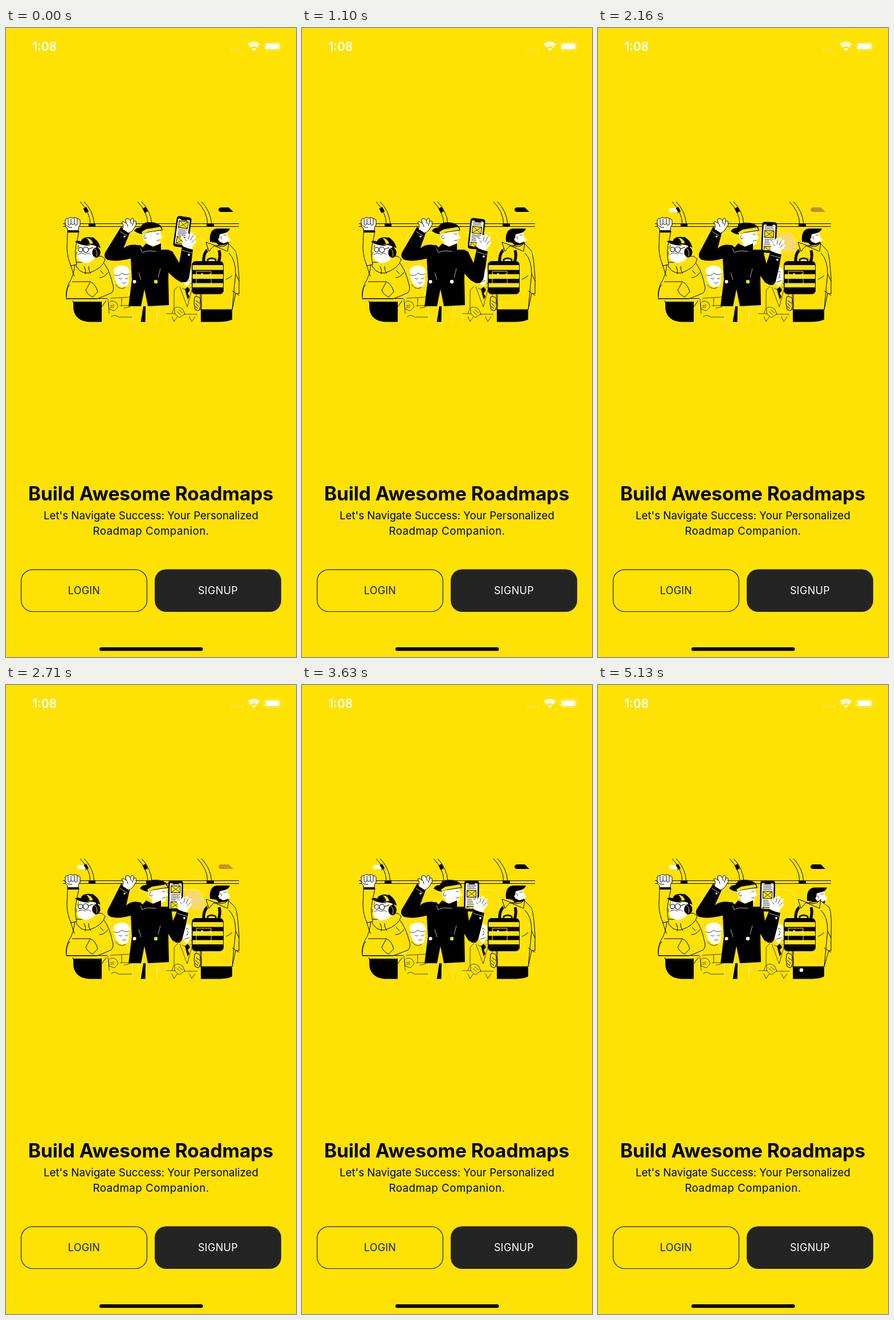
Animation of 509 by 1101 pixels, one loop 5160 ms. Source, as an HTML page:

```html
<!DOCTYPE html>
<html lang="en">
<head>
<meta charset="utf-8">
<title>Build Awesome Roadmaps</title>
<style>
html, body { margin: 0; width: 100%; height: 100%; overflow: hidden; background: #fee204; }
svg { display: block; width: 509px; height: 1101px; font-family: Inter, sans-serif; }
.k { fill: #000; }
.w { fill: #fff; }
.y { fill: #fee204; }
.l { fill: none; stroke: #000; stroke-width: 1; }
.y.o, .w.o { stroke: #000; stroke-width: 1; }
.t { fill: none; stroke: #fff; stroke-width: .7; }
.p { fill: none; stroke: #fff27a; stroke-width: .9; }
.d { fill: none; stroke: #000; stroke-width: .7; }
.mid { text-anchor: middle; }
</style>
</head>
<body>
<svg viewBox="0 0 509 1101">
  <defs>
    <clipPath id="screen"><rect x="-10.5" y="-22.5" width="21" height="45" rx="2"/></clipPath>
    <clipPath id="scene"><path d="M98 300H411V490Q408 514.5 374 514.5H146Q122 513 118 492H98Z"/></clipPath>
  </defs>

  <!-- status bar -->
  <text x="46.500" y="40" font-size="20.800" font-weight="600" fill="#fff">1:08</text>
  <g fill="#fff" opacity=".25">
    <circle cx="397" cy="38" r="1.9"/><circle cx="403" cy="38" r="1.9"/>
    <circle cx="409" cy="38" r="1.9"/><circle cx="415" cy="38" r="1.9"/>
  </g>
  <path class="w" d="M435 40L431.3 36.2Q435 33.2 438.7 36.2Z"/>
  <path d="M428 33.2A10 10 0 0 1 442 33.2M425.300 29.800A14 14 0 0 1 444.700 29.800" fill="none" stroke="#fff" stroke-width="3.500"/>
  <rect x="453" y="24.7" width="29.5" height="14.6" rx="4.4" fill="none" stroke="#fff" opacity=".4"/>
  <rect class="w" x="455.3" y="27" width="24.6" height="10" rx="2.6"/>
  <path class="w" opacity=".45" d="M484 29.8Q486.4 32 484 34.4Z"/>

  <g clip-path="url(#scene)">
    <!-- carriage -->
    <path id="pane" d="M314 360H331Q347 362 347 380V392H328Z" fill="#f6d873"/>
    <path class="p" d="M182 470V370Q183 358 196 358H236M282 358H330Q347 360 347 380V410M265 490V515M282 490V515"/>
    <g id="arches"></g>
    <path class="k" d="M135.5 316L141 313L145 321L139.5 324ZM239.5 316L245 313L249 321L243.5 324Z"/>
    <path id="lampL" class="w" d="M129 315H136L141 322.5H129Q125 321.5 125 318.7Q125 316 129 315Z"/>
    <path id="lampR" d="M377 314H391L399 322H377Q373 321 373 318Q373 315 377 314Z"/>
    <path class="l" d="M100 342.5H409M100 347.5H409"/>
    <path class="k" d="M145 342H157V347H145ZM246 342H258V347H246ZM352 342H365V347H352Z"/>

    <!-- seated reader -->
    <path class="w" d="M190 431Q186 420 197 417Q210 413 216 422Q220 428 215 434Q217 443 214 450Q207 456 199 452Q191 445 190 431Z"/>
    <path class="d" d="M190 432Q197 436 203 429Q211 434 216 430M198 438Q201 441 204 438M209 438Q212 441 214 437M204 446Q208 448 211 445M192 449Q200 460 210 454"/>
    <path class="p" d="M191 452Q181 459 180 472L177 497M211 455L216 463V472"/>
    <path class="d" d="M183 473L218 471V486H200M203 472V486M180 482Q185 474 194 481L197 488L190 495L181 492ZM183 486L190 485M183 489L190 488M179 474L181 500M184 506Q190 500 198 506H222M207 490Q214 490 221 486"/>

    <!-- seated man -->
    <path class="w" d="M312 422Q318 415 324 422Q328 434 323 445L317 453L309 442Z"/>
    <path class="d" d="M316 427Q319 425 321 428M319 430V437L316 438M313 445L322 442M302 452L295 459V490L291 500M324 446L334 457V492M305 453L318 488L328 452M309 455L318 460L325 453"/>
    <path class="k" d="M314 457L319 453L323 459L319 464L322 470L319 475L316 465Z"/>
    <path class="d" d="M296 490Q302 486 310 492L314 501L304 507L296 500ZM300 496L307 502M303 493L310 499M281 500H297M312 501H336M291 505L295 514L301 505M322 505L326 514L332 505"/>

    <!-- rider with headphones -->
    <path class="k" d="M118 479H168V515H119Z"/>
    <path class="l" d="M117 477L121 487M176 477L168 488"/>
    <path id="hoodie" class="y o"/>
    <path class="l" d="M116 444H148Q158 449 161 462L152 471M148 444L140 459Q143 467 152 471M112 449Q106 455 106 470M179 428Q172 437 164 437M165 424L171 430M113 414L120 435M106 473.500H178"/>
    <path class="y o" d="M121 410Q126 430 145 429Q170 421 174 405Q168 396 158 401Q145 412 121 410Z"/>
    <path class="l" d="M137 417Q141 424 139 431M145 417Q144 424 149 430"/>
    <path class="y o" d="M108 356L107 386Q108 404 114 416L124 414Q119 391 125 371L128 356Z"/>
    <path class="w o" d="M104 338Q103 333 109 334Q112 330 117 333Q122 330 125 334Q130 333 130 338V345Q126 349 127 355H108Q109 350 104 347Z"/>
    <path class="l" d="M109 335V344Q112 347 114 342V334M120 333V342Q117 346 114 342M125 334V344Q121 347 120 342M103 342Q108 350 116 349"/>
    <path class="k" d="M108 354H128V358H108Z"/>
    <g id="rider">
      <path class="w" d="M128 379L126 388L123 391L125 397Q125 408 136 411Q149 413 158 401L160 381Z"/>
      <path class="d" d="M128 380L126 386M124 391V397M126 397Q132 392 139 396Q145 392 149 397"/>
      <circle class="l" cx="131" cy="388" r="4"/><circle class="l" cx="140" cy="388" r="4.8"/>
      <path class="l" d="M145 387L153 384"/>
      <path class="k" d="M131 377Q131 367 144 366Q161 366 166 385L153 380Z"/>
      <path class="y" d="M141 368Q149 367 153 377L147 378Q146 371 141 368Z"/>
      <path class="k" d="M121 374Q127 370 136 376L148 381Q133 382 121 374Z"/>
      <path d="M151 367Q161 373 160 386" fill="none" stroke="#000" stroke-width="3"/>
      <ellipse class="k" cx="158.500" cy="393" rx="7.200" ry="9"/>
      <path class="p" d="M155 386Q162 390 159 400"/>
      <path class="p" d="M163 380Q174 389 171 405" stroke-dasharray="1 1" stroke-width="3"/>
    </g>

    <!-- standing man with rucksack -->
    <path class="k" d="M342 492H397V515H342Z"/>
    <circle id="stud" class="w" cx="357" cy="499" r="3.300"/>
    <g id="rider2">
      <path class="w" d="M371 359L387 355L389 364L394 371L390 374L388 381L371 382Z"/>
      <path class="k" d="M358 374Q356 352 371 351H393Q391 357 384 359L375 361L374 367L369 376Z"/>
      <path class="k" d="M371 368L375 374L382 377L390 374L388 381Q376 385 369 376Z"/>
      <path class="d" d="M382 363L387 362M375 366Q379 364 378 370"/>
    </g>
    <path id="coat" class="y o"/>
    <path class="y o" d="M351 375L356 391L365 381L389 391L391 375Q385 385 371 382Z"/>
    <path class="l" d="M391 394Q403 405 403 430L397 493M403 430L409 443M397 460L409 468M386 440Q394 437 397 433"/>
    <path class="p" d="M395 380Q404 387 404 397" stroke-dasharray="1 1.200" stroke-width="5"/>
    <path d="M347 410Q346 396 353 389M373 410Q377 399 374 389" fill="none" stroke="#000" stroke-width="5"/>
    <path d="M354 409V405Q361 401 368 405V409" fill="none" stroke="#000" stroke-width="2.500"/>
    <rect class="k" x="326" y="408" width="56" height="58" rx="7"/>
    <path class="y" d="M327.500 415H381V423.500H327.500ZM327.500 431H381V439H327.500ZM327.500 446.500H381V454H327.500Z"/>
    <path class="p" d="M334 426H360V450H334ZM334 430L344 436L360 430" stroke-width=".6"/>
    <circle class="w" cx="344" cy="431" r="1.800"/>
    <path class="y o" d="M331 471Q337 468 341 474L343 486L338 495L332 493L330 482Z"/>
    <path class="l" d="M333 477L340 482M332 482L338 487M332 487L337 491M341 466V494"/>

    <!-- man with phone -->
    <path class="p" d="M222 487V515M270 486V500"/>
    <path class="k" d="M241 487L236.500 515H244.500L245 487Z"/>
    <g id="head">
      <path class="w" d="M244 357L271 354L271 360L275 367L271 369L270 377Q263 382 247 380L246 373Q239 371 240 362Z"/>
      <path class="d" d="M245 362Q240 363 243 368Q246 370 247 366M264 361Q267 359 269 361M264 372L270 371"/>
      <path class="k" d="M225 355Q228 349 236 349Q240 339 252 340Q266 339 273 348L275 354L248 358Q236 364 225 355Z"/>
      <path class="y" d="M246 352L271 348L273.500 353L249 357L240 361L238 357Z"/>
    </g>
    <path class="k" d="M218 387L235 380L240 384L246 377L258 383L272 377V388L286 388L285 440L286 485L249 487L243 457L237 487H215L221 440Z"/>
    <path id="armL" class="k"/>
    <path class="w o" d="M204 352Q208 345 203 340Q205 337 211 342L210 335Q214 331 218 337L221 333Q225 333 224 338Q230 337 228 342Q230 345 226 348Q222 357 215 359Z"/>
    <path class="l" d="M211 342Q214 344 214 348M218 337L220 343M224 338L222 346"/>
    <path class="t" d="M200 356L213 364M236 386L239 393L249 390L264 391M233 428L237 441M271 421L267 437"/>
    <circle class="w" cx="208" cy="365" r="1.800"/>
    <circle class="w" cx="225.500" cy="444" r="3"/>
    <circle id="button" cx="263" cy="444" r="3.200"/>
    <path id="armR" class="k"/>
    <g id="phone">
      <rect class="k" x="-13" y="-27" width="26" height="54" rx="4.500"/>
      <rect class="w" x="-10.500" y="-22.500" width="21" height="45" rx="2"/>
      <g clip-path="url(#screen)"><g id="feed"></g></g>
      <path class="k" d="M-5 -23H5V-20.500H-5Z"/>
    </g>
    <g id="hand">
      <path class="w" d="M306 363Q310 363 314 369L317 362Q320 356 322 362L325 358Q329 358 328 363L332 362Q335 364 331 370L334 371Q334 376 328 381L326 387L312 383Q307 380 310 374Z"/>
      <path class="d" d="M314 369L317 373M322 362L320 370M328 363L324 372M331 370L326 376"/>
      <path class="t" d="M309 389L327 394"/>
      <circle class="w" cx="321" cy="397" r="1.900"/>
    </g>
  </g>

  <!-- copy and buttons -->
  <text class="mid" x="254" y="827" font-size="33.400" font-weight="700">Build Awesome Roadmaps</text>
  <text class="mid" x="254.500" y="859.500" font-size="18.700">Let's Navigate Success: Your Personalized</text>
  <text class="mid" x="254.500" y="887" font-size="18.700" letter-spacing=".5">Roadmap Companion.</text>
  <rect x="26.600" y="948.100" width="220.800" height="73.400" rx="20" fill="none" stroke="#1c1c1c" stroke-width="1.200"/>
  <rect x="261" y="947.500" width="222" height="74.500" rx="20" fill="#242424"/>
  <text class="mid" x="137" y="990.700" font-size="18" letter-spacing=".2" fill="#1c1c1c">LOGIN</text>
  <text class="mid" x="372" y="990.700" font-size="18" letter-spacing=".3" fill="#fff">SIGNUP</text>
  <rect x="164" y="1084" width="181.500" height="6.300" rx="3.150"/>
</svg>
<script>
const LOOP = 5160;
const times = [0, 610, 1610, 2710, 3630, 4180, 5130];
const eased = {
  lower: [0, 0, .55, 1, 1, 1, 1],
  headX: [0, 0, 6, 10, 6, 4, 5],
  sway:  [0, 0, 3, 5, 1, 0, -1],
  nod:   [0, 1, -.6, -.6, 1, 1, -.6],
  turn:  [0, 0, 0, 0, 0, 4, 9],
  feed:  [-13, -13, 0, -12, -4, -2, -2]
};
const stepped = {
  lampL: [0, 0, 1, 1, 1, 0, 1],
  lampR: [1, 1, 1, 0, 1, 1, 1],
  stud:  [0, 0, 1, 0, 0, 0, 1],
  shine: [0, 1, 0, 0, 0, 0, 1]
};
const $ = id => document.getElementById(id);
const mix = (a, b, u) => a + (b - a) * u;
const poly = pts => "M" + pts.map(p => p.join(" ")).join("L") + "Z";

$("arches").innerHTML = [130, 231, 336].map(x =>
  `<path class="l" d="M${x} 304Q${x + 17} 321 ${x + 18} 343M${x + 7} 304Q${x + 23} 320 ${x + 25} 343"/>`).join("");

// repeating picture card followed by text lines
const PERIOD = 28;
$("feed").innerHTML = [-2, -1, 0, 1, 2].map(i => {
  const y = i * PERIOD;
  const rows = [9, 11.5, 14, 16.5, 19].map((r, j) =>
    `M-8 ${y + r}H${j % 2 ? 6 : 8}`).join("");
  return `<rect class="y o" x="-8" y="${y - 6}" width="16" height="12"/>
    <path class="d" d="M-8 ${y - 6}L8 ${y + 6}M8 ${y - 6}L-8 ${y + 6}${rows}"/>`;
}).join("");

const raised = [[284, 388], [292, 391], [304, 411], [309, 383], [328, 388],
  [325, 414], [321, 439], [315, 445], [307, 445], [297, 439], [283, 426]];
const lowered = [[284, 388], [290, 392], [293, 413], [301, 394], [320, 399],
  [315, 423], [309, 446], [305, 451], [299, 451], [292, 447], [283, 432]];

function pose(t) {
  let i = times.length - 1;
  while (times[i] > t) i--;
  const j = Math.min(i + 1, times.length - 1);
  const u = i === j ? 0 : (t - times[i]) / (times[j] - times[i]);
  const s = u * u * (3 - 2 * u);
  const out = {};
  for (const k in eased) out[k] = mix(eased[k][i], eased[k][j], s);
  for (const k in stepped) out[k] = stepped[k][u < .5 ? i : j];
  return out;
}

function move(id, x, y, turn = "") {
  $(id).setAttribute("transform", `translate(${x} ${y}) ${turn}`);
}

function draw(t) {
  const p = pose(t), q = p.lower, e = 173 + p.sway, n = p.nod, c = p.turn;
  move("head", p.headX, q);
  move("phone", mix(309.5, 297.5, q), mix(357, 369.5, q), `rotate(${mix(8, 1, q)})`);
  move("feed", 0, p.feed);
  move("hand", -8 * q, 11 * q);
  move("rider", 0, n * .7, `rotate(${n} 145 405)`);
  move("rider2", c, c * .4);
  $("armR").setAttribute("d", poly(raised.map((a, i) => a.map((v, k) => mix(v, lowered[i][k], q)))));
  $("armL").setAttribute("d",
    `M202 348L217 359L${e + 33} 386Q${e + 43} 376 237 381L244 403H221Q${e + 21} 410 ${e + 6} 406Q${e - 3} 402 ${e + 1} 393Z`);
  $("hoodie").setAttribute("d",
    `M121 411Q120 432 110 448Q104 461 106 474H160L${185 + n} 464Q${191 + n} 458 ${187 + n} 447Q182 424 170 409Z`);
  $("coat").setAttribute("d",
    `M352 388Q344 397 343 430V493H397L${403 + c * .2} 465H409V440Q${407 + c * .4} 398 ${402 + c * .4} 389L391 378L363 382Z`);
  $("lampL").style.opacity = p.lampL;
  $("lampR").style.fill = p.lampR ? "#000" : "#bd9435";
  $("pane").style.opacity = 1 - p.lampR;
  $("stud").style.opacity = p.stud;
  $("button").style.fill = p.shine ? "#fff" : "#fee204";
}

const start = performance.now();
function tick(now) {
  draw(Math.max(0, now - start) % LOOP);
  requestAnimationFrame(tick);
}
draw(0);
requestAnimationFrame(tick);
</script>
</body>
</html>
```
